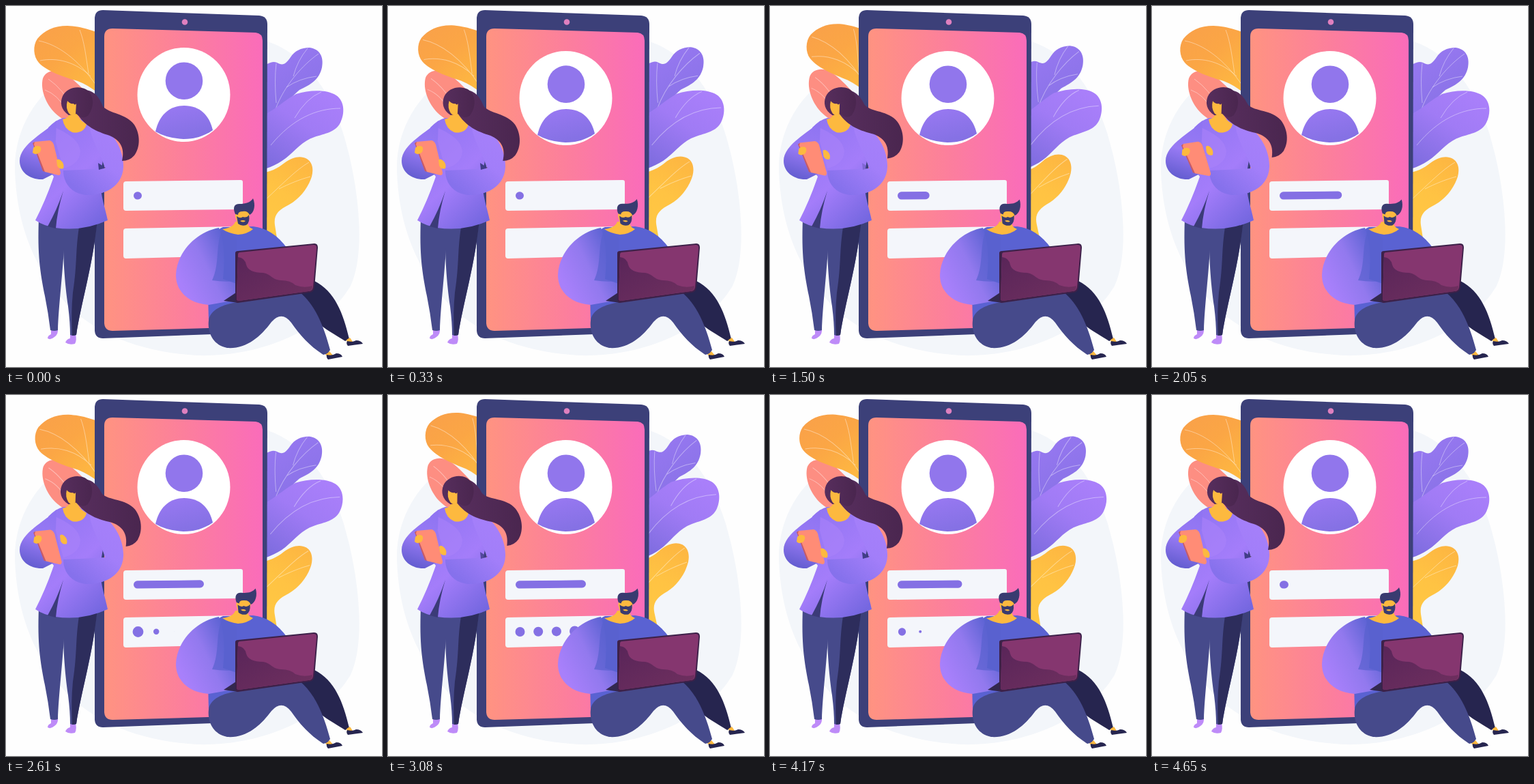
Animation of 551 by 529 pixels, one loop 4.72 s. Source, as an HTML page:

```html
<!DOCTYPE html>
<html lang="en">
<head>
<meta charset="utf-8">
<title>Sign in</title>
<style>
  html, body { margin: 0; width: 100%; height: 100%; overflow: hidden; background: #fefefe; }
  svg { display: block; width: 100%; height: 100%; }
  .vein { fill: none; stroke: #fff; stroke-opacity: .4; stroke-width: 1; }
  .skin { fill: #fdb93f; }
  .dark { fill: #26254f; }
  .denim { fill: #464a8b; }
</style>
</head>
<body>
<svg viewBox="0 0 551 529">
  <defs>
    <linearGradient id="screen"><stop stop-color="#ff9381"/><stop offset=".5" stop-color="#fc7f9c"/><stop offset="1" stop-color="#fa6cba"/></linearGradient>
    <linearGradient id="amber" x2=".8" y2="1"><stop stop-color="#f9a04a"/><stop offset=".4" stop-color="#fba645"/><stop offset="1" stop-color="#ffc13f"/></linearGradient>
    <linearGradient id="gold" x1=".8" y1="0" x2=".4" y2="1"><stop stop-color="#fdb642"/><stop offset=".5" stop-color="#ffc343"/><stop offset="1" stop-color="#ffc843"/></linearGradient>
    <linearGradient id="plum" x1=".9" y1=".1" x2=".25" y2="1"><stop stop-color="#a97ffa"/><stop offset=".4" stop-color="#a07bf5"/><stop offset="1" stop-color="#7b6bdd"/></linearGradient>
    <linearGradient id="lilac" x2=".4" y2="1"><stop stop-color="#9a79f3"/><stop offset="1" stop-color="#8571e4"/></linearGradient>
    <linearGradient id="tunic" x1=".2" y1="0" x2=".8" y2="1"><stop stop-color="#8f74f2"/><stop offset=".55" stop-color="#a47dfa"/><stop offset="1" stop-color="#7567e0"/></linearGradient>
    <linearGradient id="sleeveL" x1=".6" y1="0" x2=".4" y2="1"><stop stop-color="#8f74f2"/><stop offset=".5" stop-color="#987af4"/><stop offset="1" stop-color="#625ccf"/></linearGradient>
    <linearGradient id="sleeveR" x1=".8" y1="0" x2=".2" y2=".9"><stop stop-color="#a680fa"/><stop offset=".5" stop-color="#a27ef9"/><stop offset="1" stop-color="#8671ec"/></linearGradient>
    <linearGradient id="hair"><stop stop-color="#572e5d"/><stop offset="1" stop-color="#4a264f"/></linearGradient>
    <linearGradient id="sleeveM" x1=".1" y1=".75" x2=".9" y2=".25"><stop stop-color="#a880fb"/><stop offset=".5" stop-color="#9279ee"/><stop offset="1" stop-color="#5a62d2"/></linearGradient>
    <linearGradient id="lid" x2="1" y2="1"><stop stop-color="#592559"/><stop offset="1" stop-color="#70305f"/></linearGradient>
  </defs>

  <path fill="#f3f6fa" d="M13 240C12 180 45 130 85 105C160 55 300 30 383 52C445 72 485 140 502 215C518 280 526 365 505 410C470 470 380 515 280 512C200 508 120 480 75 420C35 370 15 310 13 240Z"/>

  <g id="pinkLeaf">
    <path fill="#fd8e82" d="M142 185C110 180 88 172 72 157C58 143 50 122 54 106C58 95 72 92 84 98C100 106 120 130 142 150Z"/>
    <path class="vein" d="M62 107Q84 122 98 150M57 123Q76 130 88 152"/>
  </g>
  <g id="amberLeaf">
    <path fill="url(#amber)" d="M160 146C140 133 128 119 105 110C85 104 60 96 48 83C40 74 39 58 46 48C56 36 70 29 90 29C110 30 130 35 160 51Z"/>
    <path class="vein" d="M48 51C75 56 106 78 132 116M50 80C75 75 102 82 124 103M108 35C115 53 117 73 121 99"/>
  </g>
  <g id="goldLeaf">
    <path fill="url(#gold)" d="M370 246C388 243 398 238 408 230C420 221 432 219 441 224C449 229 451 239 448 250C443 266 431 282 415 291C399 299 392 306 394 321L397 340H370Z"/>
    <path class="vein" d="M444 229C425 240 405 261 380 284M446 250C431 254 416 260 400 268"/>
  </g>
  <g id="topLeaf">
    <path fill="url(#lilac)" d="M370 92C386 83 390 80 397 83C406 88 410 85 417 75C423 66 432 61 445 61C460 63 466 75 463 90C459 108 447 115 430 123C410 140 395 165 370 190Z"/>
    <path class="vein" d="M458 70C435 86 408 116 395 151M455 103Q430 106 411 119M442 62Q427 80 421 103M396 84Q393 110 396 142"/>
  </g>
  <g id="sideLeaf">
    <path fill="url(#plum)" d="M360 165C388 160 400 143 425 129C445 123 470 122 484 131C496 139 497 157 490 171C483 185 467 187 452 192C434 198 425 211 410 223C396 234 380 239 360 245Z"/>
    <path class="vein" d="M490 150C455 150 420 165 388 204M462 126Q440 135 423 164"/>
  </g>

  <path fill="#3c4079" d="M130 17Q131 6 142 6L371 14Q383 15 383 27L382 420L330 480L142 487Q131 487 130 476Z"/>
  <path fill="url(#screen)" d="M144 45Q144 33 156 33L366 39Q376 40 376 51L376 400L330 471L156 476Q145 476 144 465Z"/>
  <circle cx="262" cy="23.5" r="4.3" fill="#df80bf"/>

  <g id="avatar">
    <ellipse cx="260.5" cy="135" rx="68" ry="69" fill="#fff"/>
    <circle cx="261" cy="114.7" r="27.3" fill="#9176ec"/>
    <path fill="url(#lilac)" d="M219 189C225 163 241 151 261 151C284 151 298 165 303 187C290 196 276 200 260 200Q236 199 219 189Z"/>
  </g>

  <g fill="#f4f6fb">
    <path d="M176 257L344 255Q347 255 347 258V298L176 300Q172 300 172 296V261Q172 257 176 257Z"/>
    <path d="M176 326L342 323V366L176 370Q172 370 172 366V330Q172 326 176 326Z"/>
  </g>
  <rect id="bar" x="187" y="272.3" height="11.2" rx="5.6" fill="#8470e4" transform="rotate(-.6 193 278)"/>
  <g id="dots" fill="#8470e4"></g>

  <!-- woman -->
  <path fill="#be8bf8" d="M66 472H76Q77 481 71 485Q65 490 61 487Q61 483 66 481ZM94 481H102Q104 490 101 495Q92 497 87 493Q89 488 94 487Z"/>
  <path class="denim" d="M48 312C46 365 50 390 57 425Q62 450 65 475Q71 477 76 475C77 440 83 395 86 340V310Z"/>
  <path class="denim" d="M84 310C83 370 86 405 91 440Q94 464 94 482Q99 484 103 482C110 435 128 378 134 312Z"/>
  <path fill="#2d2d5c" d="M108 318C101 360 105 375 98 420Q95 450 97 483L103 482C110 435 128 378 134 312Z"/>
  <path fill="url(#tunic)" d="M84 164Q74 166 62 178L58 235L70 250Q58 285 43 314Q55 322 72 325Q112 331 149 314C145 292 136 275 139 244L148 190Q136 171 117 166Z"/>
  <path fill="#3b3b78" d="M84 271Q75 300 73 326L61 323Q75 298 84 271Z"/>
  <path fill="#ab83fb" opacity=".6" d="M66 175C84 184 107 193 109 213Q108 232 84 238Z"/>
  <path fill="url(#sleeveL)" d="M74 168C60 184 20 202 20 227C20 244 36 255 54 254L70 246L53 208L73 197Z"/>
  <path fill="url(#sleeveR)" d="M122 168C153 175 173 208 172 236C171 264 145 278 117 277C97 275 84 261 84 241Q113 240 145 238C139 214 122 195 122 168Z"/>
  <path id="notch" fill="#413d88" d="M135 230L146 237L136 240Z"/>

  <path class="skin" d="M83 166Q92 165 94 155H104Q104 165 118 173C116 184 104 187 97 185Q85 180 83 166Z"/>
  <path id="tail" fill="url(#hair)" d="M105 125C128 118 137 135 142 147C151 158 176 157 188 174C197 188 197 207 188 219Q181 227 170 227C175 207 166 196 152 190C133 184 116 177 103 156Z"/>
  <g id="head">
    <path fill="url(#hair)" d="M92 160C80 152 79 141 83 132C89 120 105 116 117 122C130 130 130 148 120 161Q112 167 103 158Z"/>
    <path class="skin" d="M90 139Q87 149 92 157Q97 163 102 158L103 143Q101 146 99 143Q94 144 90 139Z"/>
  </g>
  <g id="tablet">
    <path fill="#c65b68" d="M39 201L42 199L57 243L54 242Z"/>
    <path fill="#ff8c76" d="M42 199L64 197Q68 198 70 203L80 244Q80 248 77 248L57 243L41 203Z"/>
    <path class="skin" d="M40 208Q44 203 50 206Q53 210 49 215Q43 219 39 215Z"/>
  </g>
  <path id="hand" class="skin" d="M74 226Q76 223 80 226Q86 231 84 238Q78 240 75 234Z"/>

  <!-- man -->
  <path class="dark" d="M452 403C482 418 494 450 503 488L497 491C478 478 440 462 425 420Z"/>
  <path class="skin" d="M499 489L504 486L508 492L500 493ZM468 510L474 506L479 512L470 513Z"/>
  <path class="dark" d="M500 491Q508 493 513 490Q520 490 523 495L501 498Q498 495 500 491Z"/>
  <path fill="#5a62d2" d="M318 324C300 330 294 365 297 460L360 442L412 355C398 336 382 325 362 323Z"/>
  <path class="denim" d="M297 461C299 445 318 437 340 434L430 419C452 437 465 466 475 504Q471 511 465 511C446 499 431 483 418 464Q404 446 389 463C372 486 351 503 324 501C303 497 295 478 297 461Z"/>
  <path class="dark" d="M470 511Q478 513 484 509Q491 509 493 514L472 518Q469 515 470 511Z"/>
  <path fill="url(#sleeveM)" d="M312 325C278 331 250 362 249 394C249 419 268 436 297 438L325 433L338 422V407L318 400Q323 350 312 325Z"/>
  <path fill="#5962cf" opacity=".7" d="M302 402C314 377 306 350 318 325L338 340V403Q320 405 302 402Z"/>
  <path fill="#33284f" d="M319 432L337 420L340 435Z"/>
  <path fill="#3d2149" d="M336 362Q336 359 340 359L452 348Q457 348 457 354L452 413Q451 419 445 420L340 435Q336 435 336 429Z"/>
  <path fill="#85366f" d="M340 364Q340 361 343 361L451 350Q456 350 455 356L450 412Q449 418 443 418L341 432Q338 432 338 428Z"/>
  <path fill="url(#lid)" d="M340 368Q350 369 352 379Q355 391 377 391C389 393 389 401 403 402Q417 402 424 409Q437 414 449 410Q449 418 443 418L341 432Q338 432 338 428Z"/>
  <path class="skin" d="M317 327Q333 325 336 316L354 317Q354 324 362 327Q354 334 340 335Q326 333 317 327Z"/>
  <g id="face">
    <path class="skin" d="M336 298L358 299L356 314L350 322L340 320L336 309Z"/>
    <path fill="#393b70" d="M336 305C332 296 334 290 342 290C351 290 358 288 362 282C366 291 364 303 357 306Q354 300 347 301Q340 301 340 306ZM338 308Q343 312 347 309Q353 311 356 306Q358 317 352 321Q345 323 340 319Z"/>
    <path class="skin" d="M343 315Q347 313 351 315Q348 318 343 315Z"/>
  </g>
</svg>
<script>
const LOOP = 4720;
const el = id => document.getElementById(id);

// Smooth step from 0 to 1 between two times, and a rise followed by a fall.
function ramp(t, from, to) {
  const u = Math.min(1, Math.max(0, (t - from) / (to - from)));
  return u * u * (3 - 2 * u);
}
const swell = (t, a, b, c, d) => ramp(t, a, b) - ramp(t, c, d);

function pose(id, x, y, turn = 0, cx = 0, cy = 0) {
  el(id).setAttribute('transform', `translate(${x} ${y}) rotate(${turn} ${cx} ${cy})`);
}

const dots = Array.from({ length: 5 }, (_, i) => {
  const dot = document.createElementNS('http://www.w3.org/2000/svg', 'circle');
  dot.setAttribute('cx', 193.5 + 26.7 * i);
  dot.setAttribute('cy', 347 - .3 * i);
  el('dots').append(dot);
  return dot;
});

function draw(t) {
  // Leaves swing out and back twice per loop.
  const sway = swell(t % (LOOP / 2), 100, 1000, 1250, 1950);
  pose('amberLeaf', 0, 0, 6.3 * sway, 130, 220);
  pose('pinkLeaf', 0, 0, 3 * sway, 130, 220);
  pose('topLeaf', 0, 0, -2.8 * sway, 360, 220);
  pose('sideLeaf', -8 * sway, 0, -3 * sway, 385, 220);
  pose('goldLeaf', -4 * sway, -2 * sway, -4.5 * sway, 385, 330);

  pose('avatar', 0, -5 * (1 - swell(t, 0, 350, 4650, LOOP)));

  const lean = swell(t, 0, 800, 3700, 4450);
  const nod = swell(t, 2700, 3500, 3700, 4450);
  const lift = swell(t, 500, 2050, 3700, 4450);
  const drift = swell(t, 0, 740, 1000, 2050);
  pose('head', 0, 0, -2 * lean - 2.5 * nod, 97, 168);
  pose('tail', -4 * drift - 5 * nod, 0, -5 * lift - 2 * nod, 115, 160);

  const tilt = swell(t, 1000, 2000, 2250, 2800);
  const swipe = swell(t, 300, 2200, 2650, 3250);
  pose('tablet', 5 * tilt, 2 * tilt, -3 * tilt, 60, 222);
  pose('hand', 5 * swipe, -20 * swipe);
  el('notch').setAttribute('opacity', 1 - swipe);

  pose('face', 0, 0, 5 * swell(t, 0, 500, 3900, 4450), 347, 325);

  el('bar').setAttribute('width', 12 + 91 * swell(t, 850, 2400, 4050, 4690));

  // Password dots pop in one after another, then shrink away.
  dots.forEach((dot, i) => {
    const start = 2320 + 130 * i, end = 4350 - 90 * i;
    const size = 8 * swell(t, start, start + 310, end - 250, end);
    dot.setAttribute('r', Math.max(0, size - ramp(t, start + 310, start + 450) * size / 8));
  });
}

function tick() {
  draw(performance.now() % LOOP);
  requestAnimationFrame(tick);
}
tick();
</script>
</body>
</html>
```
